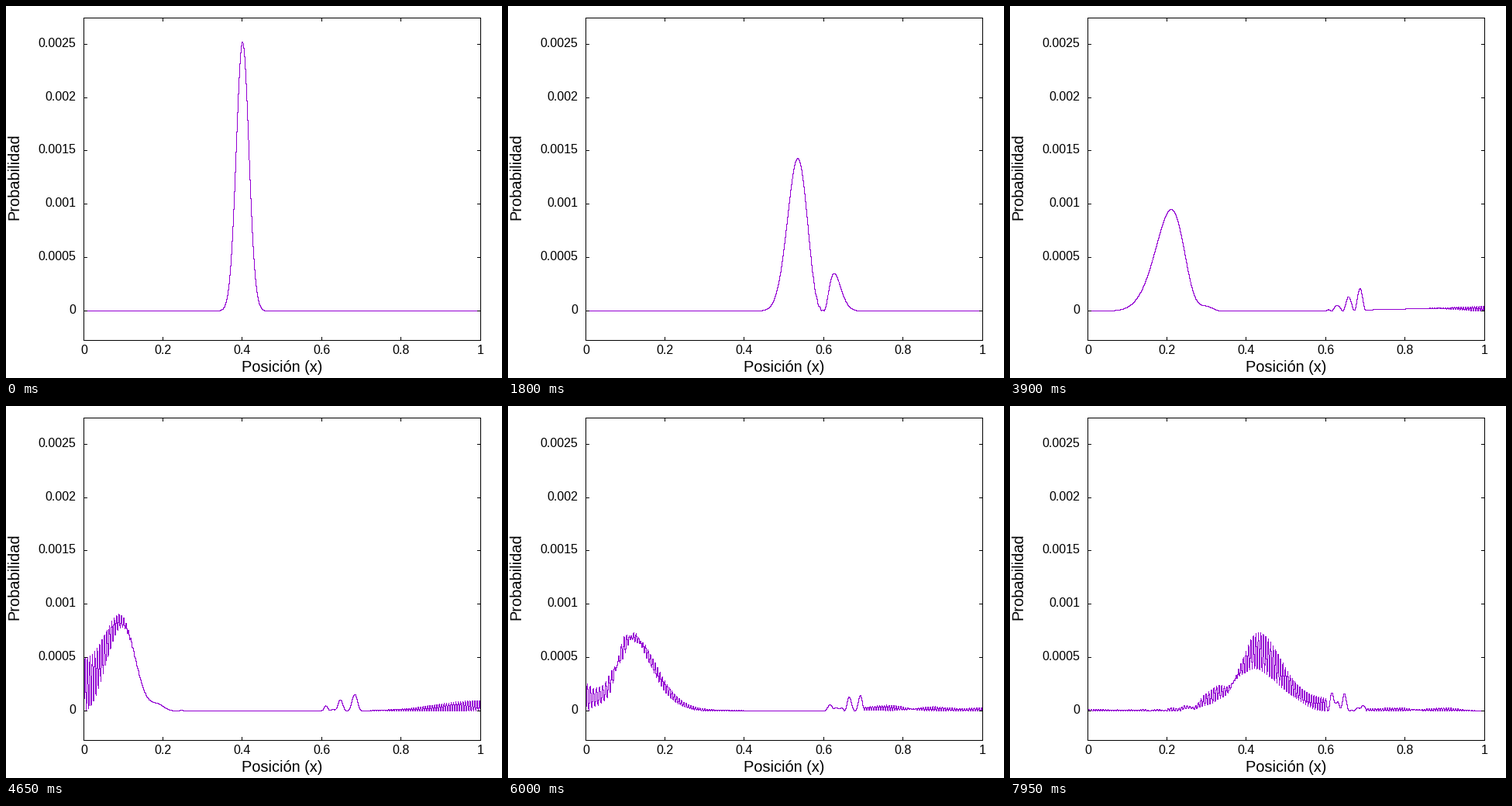
A matplotlib script for the animation above (8 s loop, 640 px wide and 480 px high).

```python
import numpy as np
import matplotlib.pyplot as plt
from matplotlib.animation import FuncAnimation
from matplotlib.colors import to_rgba

# Wave packet in a box with a potential barrier, solved in the sine basis.
CENTER, SPREAD = 0.4, 1000.0        # psi ~ exp(-SPREAD * (x - CENTER)^2)
K0, K_BARRIER = 476.0, 501.0        # packet and barrier wave numbers
BARRIER = (0.6, 0.7)
STEP_TIME, STEPS = 5e-5, 54
CELLS = 10000                       # probability is given per cell
MODES = 600

WIDTH, HEIGHT, DPI = 640, 480, 100
LEFT, RIGHT, TOP, BOTTOM = 100, 612, 15, 431
Y_MIN, Y_MAX = -0.000275, 0.00275
PURPLE = "#9400d3"
PX = 72 / DPI


def barrier_integral(j):
    """Integral of cos(j pi x) over the barrier."""
    a, b = BARRIER
    safe = np.where(j == 0, 1, j) * np.pi
    return np.where(j == 0, b - a, (np.sin(safe * b) - np.sin(safe * a)) / safe)


def solve(x):
    n = np.arange(1, MODES + 1)
    m = n[:, None]
    hamiltonian = np.diag((n * np.pi) ** 2 / 2)
    hamiltonian += K_BARRIER ** 2 / 2 * (barrier_integral(m - n) - barrier_integral(m + n))
    energy, states = np.linalg.eigh(hamiltonian)

    basis = np.sqrt(2) * np.sin(np.pi * np.outer(x, n))
    psi = np.exp(-SPREAD * (x - CENTER) ** 2 + 1j * K0 * x)
    coef = states.T @ (basis.T @ psi)
    coef /= np.linalg.norm(coef)
    times = STEP_TIME * np.arange(STEPS)
    evolved = states @ (coef[:, None] * np.exp(-1j * np.outer(energy, times)))
    amplitude2 = (basis @ evolved.real) ** 2 + (basis @ evolved.imag) ** 2
    return amplitude2.T / CELLS


def to_px_x(x):
    return LEFT + (RIGHT - LEFT) * x


def to_px_y(p):
    return BOTTOM - (BOTTOM - TOP) * (p - Y_MIN) / (Y_MAX - Y_MIN)


x = np.linspace(0, 1, CELLS + 1)
probability = solve(x)
fine_x = np.linspace(0, 1, 8 * CELLS + 1)
columns = np.rint(to_px_x(fine_x)).astype(int)

fig = plt.figure(figsize=(WIDTH / DPI, HEIGHT / DPI), dpi=DPI, facecolor="white")
ax = fig.add_axes([0, 0, 1, 1])
ax.axis("off")


def curve_pixels(p):
    """Crisp one-pixel curve on a transparent stage."""
    pixels = np.zeros((HEIGHT, WIDTH, 4))
    rows = np.rint(to_px_y(np.interp(fine_x, x, p))).astype(int)
    pixels[rows, columns] = to_rgba(PURPLE)
    return pixels


curve = ax.imshow(curve_pixels(probability[0]), extent=(0, WIDTH, HEIGHT, 0),
                  aspect="auto", interpolation="nearest", zorder=1)
ax.set_xlim(0, WIDTH)
ax.set_ylim(HEIGHT, 0)


def segment(x0, y0, x1, y1):
    ax.plot([x0 + 0.5, x1 + 0.5], [y0 + 0.5, y1 + 0.5], color="black", lw=PX,
            snap=False, solid_capstyle="projecting", zorder=3)


def label(px, py, text, size, **kw):
    ax.text(px, py, text, fontsize=size * PX, family="Liberation Sans",
            va="baseline", rotation_mode="anchor", **kw)


for y in (TOP, BOTTOM):
    segment(LEFT, y, RIGHT, y)
for side in (LEFT, RIGHT):
    segment(side, TOP, side, BOTTOM)

TICK = 4
for i in range(6):
    tx = int(to_px_x(i / 5))
    segment(tx, BOTTOM, tx, BOTTOM - TICK)
    segment(tx, TOP, tx, TOP + TICK)
    label(tx + 0.5, 449, f"{i / 5:g}", 16, ha="center")

    value = i * 0.0005
    ty = int(to_px_y(value))
    segment(LEFT, ty, LEFT + TICK, ty)
    segment(RIGHT, ty, RIGHT - TICK, ty)
    label(90.5, ty + 4, f"{value:g}", 16, ha="right")

label(356, 472, "Posición (x)", 20, ha="center")
label(16, 220.5, "Probabilidad", 20, ha="center", rotation=90)


def draw(frame):
    curve.set_data(curve_pixels(probability[frame // 3]))
    return curve,


anim = FuncAnimation(fig, draw, frames=160, interval=50, repeat=True, repeat_delay=0)
plt.show()
```
